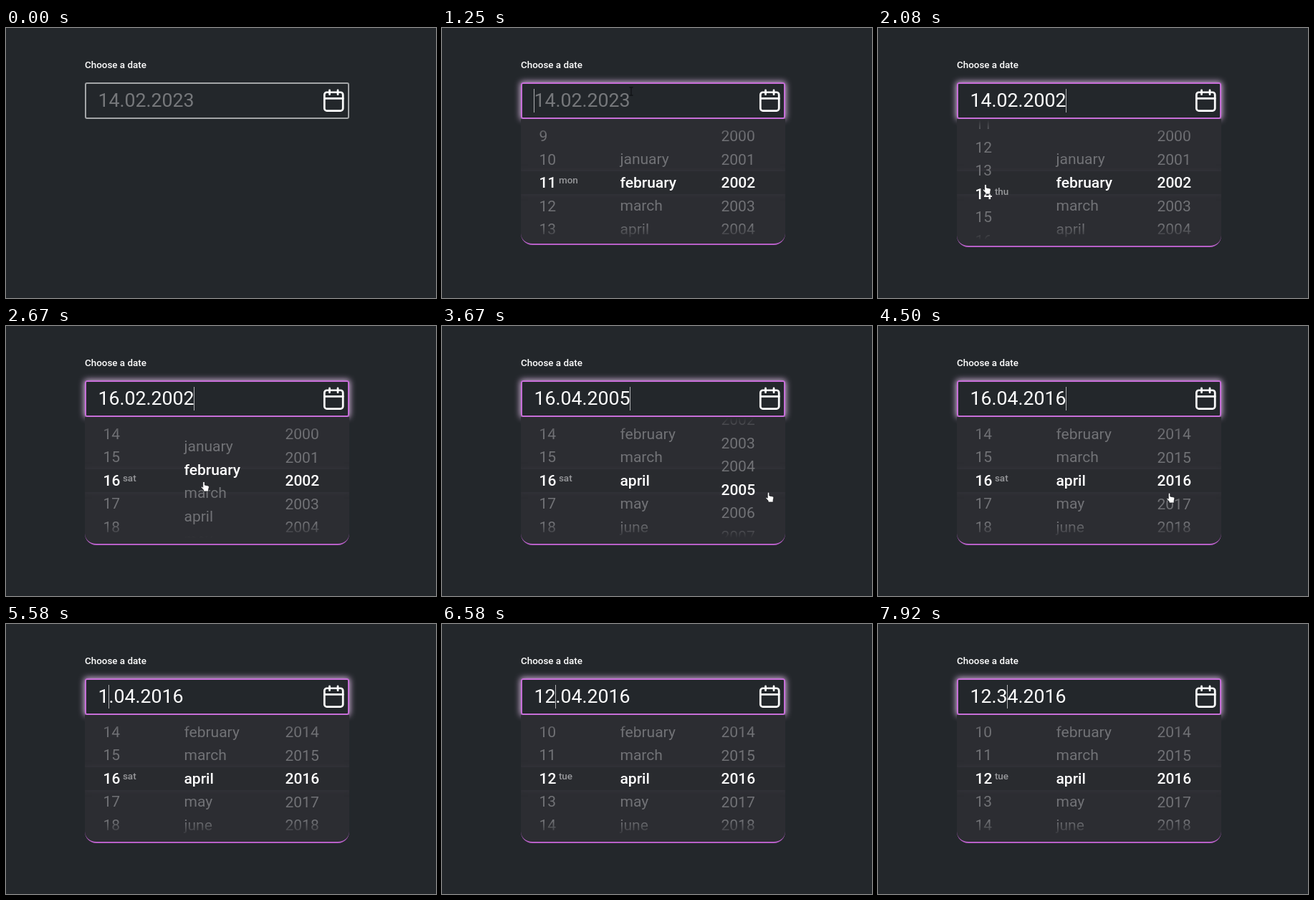
An HTML page that plays this animation: 600x377 px, repeating every 8 s.

```html
<!DOCTYPE html>
<html lang="en">
<head>
<meta charset="utf-8">
<title>Date picker</title>
<style>
  html, body { margin: 0; width: 100%; height: 100%; overflow: hidden; background: #23272b; }
  body { position: relative; font-family: Roboto, sans-serif; color: #fff; }
  body > *, .wheel, #band { position: absolute; box-sizing: border-box; }
  #label { left: 110px; top: 42px; font-size: 13.4px; font-weight: 500; line-height: 20px; }
  #field {
    left: 110px; top: 76px; width: 369px; height: 51px;
    border: 2px solid #a3a5a7; border-radius: 3px;
    padding-left: 16.4px; font-size: 26.7px; line-height: 46px; white-space: pre;
  }
  #field.focus { border-color: #c76fd8; box-shadow: 0 0 8px 1px rgba(238, 200, 247, .9); }
  #field.empty { color: #76787b; }
  #caret { position: absolute; top: 7px; width: 1px; height: 33px; background: #b0b1b3; visibility: hidden; }
  .focus #caret { visibility: visible; }
  #icon { left: 440.2px; top: 84px; width: 34.5px; height: 34.5px; }
  #icon, #beam { fill: none; stroke: #fff; stroke-width: 1.9; stroke-linecap: round; stroke-linejoin: round; }
  #panel {
    left: 110px; top: 127px; width: 369px; overflow: hidden;
    background: #2c2d32; border-bottom: 2px solid #b860c8; border-radius: 0 0 16px 16px;
  }
  #band {
    left: 0; top: 73px; width: 100%; height: 32px;
    background: #292b2f; box-shadow: 0 0 6px 1px rgba(58, 59, 65, .6);
  }
  #wheels {
    position: absolute; left: 0; top: 0; width: 100%; height: 178px; overflow: hidden;
    -webkit-mask-image: linear-gradient(transparent 1px, #000 22px, #000 148px, transparent 169px);
    mask-image: linear-gradient(transparent 1px, #000 22px, #000 148px, transparent 169px);
  }
  .wheel { top: 0; font-size: 21px; line-height: 32.5px; color: #717276; white-space: nowrap; }
  .wheel .on { color: #fff; font-weight: 500; }
  sup { position: absolute; margin: -4px 0 0 3.5px; font-size: 13.5px; line-height: 32.5px; color: #97989b; }
  #hand, #beam { left: 0; top: 0; overflow: visible; }
  #beam { stroke: #111316; stroke-width: 1.3; }
</style>
</head>
<body>
<div id="label">Choose a date</div>
<div id="field"><span id="before"></span><i id="caret"></i><span id="after"></span></div>
<svg id="icon" viewBox="0 0 24 24">
  <rect x="3" y="4" width="18" height="18" rx="2.4"/>
  <path d="M16 2v4M8 2v4M3 10h18"/>
</svg>
<div id="panel"><div id="band"></div><div id="wheels"></div></div>
<svg id="beam" width="10" height="12"><path d="M-2 -5.5h4M0 -5.5v11M-2 5.5h4"/></svg>
<svg id="hand" width="12" height="15">
  <path fill="#fff" stroke="#17191c" stroke-width=".8" stroke-linejoin="round"
    d="M-1.3 1Q0 -.7 1.3 1V5L6 6Q7.6 6.4 7.4 8L6.6 11V14H-.4V12L-3.6 8.6Q-4 6.8 -2.5 7.2L-1.3 8.3Z"/>
</svg>
<script>
const LOOP = 8000, ROW = 32.5, FIRST_ROW = 72.5;
const PLACEHOLDER = '14.02.2023';
const MONTHS = ['january', 'february', 'march', 'april', 'may', 'june', 'july',
  'august', 'september', 'october', 'november', 'december'];
const WEEKDAYS = ['sun', 'mon', 'tue', 'wed', 'thu', 'fri', 'sat'];
const FOCUS = 910, FIRST_SCROLL = 1830;

const $ = id => document.getElementById(id);
const clamp = x => Math.min(1, Math.max(0, x));
const smooth = x => x * x * (3 - 2 * x);
const progress = (t, start, end) => clamp((t - start) / (end - start));
const pad = n => String(n).padStart(2, '0');
const range = (from, to) => Array.from({ length: to - from + 1 }, (_, i) => from + i);

// Tracks are lists of [time, ...values], eased between neighbours.
function sample(track, t) {
  const next = track.findIndex(key => key[0] > t);
  if (next < 0) return track[track.length - 1].slice(1);
  if (next === 0) return track[0].slice(1);
  const a = track[next - 1], b = track[next];
  const k = smooth(progress(t, a[0], b[0]));
  return a.slice(1).map((v, i) => v + (b[i + 1] - v) * k);
}

const pointerTrack = [
  [330, 468, 89], [580, 264, 88.5], [1300, 264, 88.5], [1580, 150, 218],
  [2330, 150, 218], [2560, 276, 217], [2900, 276, 217], [3330, 455.5, 232],
  [4200, 455.5, 232], [4420, 406.5, 233], [4520, 406.5, 233], [5080, 159, 102]
];

// Keyboard edits: [time, text, caret index].
const edits = [
  [5120, '16.04.2016', 2], [5500, '1.04.2016', 1], [6080, '12.04.2016', 2],
  [6830, '12.04.2016', 3], [7080, '12.04.2016', 4], [7450, '12.4.2016', 3],
  [7750, '12.34.2016', 4]
];

function makeWheel(left, first, labels, track) {
  const el = document.createElement('div');
  el.className = 'wheel';
  el.style.left = left + 'px';
  const rows = labels.map(text => {
    const row = document.createElement('div');
    row.textContent = text;
    el.append(row);
    return row;
  });
  $('wheels').append(el);
  return {
    rows,
    update(t) {
      const index = sample(track, t)[0] - first;
      const selected = Math.round(index);
      el.style.transform = `translateY(${FIRST_ROW - index * ROW}px)`;
      rows.forEach((row, i) => row.classList.toggle('on', i === selected));
      return first + selected;
    }
  };
}

const dayWheel = makeWheel(25.5, 1, range(1, 31),
  [[FIRST_SCROLL, 11], [2330, 16], [6080, 16], [6500, 12]]);
const monthWheel = makeWheel(138.5, 1, MONTHS, [[2580, 2], [2870, 4]]);
const yearWheel = makeWheel(279.5, 1990, range(1990, 2030), [[3470, 2002], [4200, 2016]]);
const weekday = document.createElement('sup');

function place(el, visible, [x, y]) {
  el.style.display = visible ? 'block' : 'none';
  el.style.transform = `translate(${x}px, ${y}px)`;
}

function render(t) {
  const focused = t >= FOCUS, empty = t < FIRST_SCROLL;
  const day = dayWheel.update(t), month = monthWheel.update(t), year = yearWheel.update(t);

  weekday.textContent = WEEKDAYS[new Date(year, month - 1, day).getDay()];
  const dayRow = dayWheel.rows[day - 1];
  if (weekday.parentNode !== dayRow) dayRow.append(weekday);

  let text = empty ? PLACEHOLDER : `${pad(day)}.${pad(month)}.${year}`;
  let caret = empty ? 0 : text.length;
  for (const [time, value, index] of edits) if (t >= time) [text, caret] = [value, index];
  $('before').textContent = text.slice(0, caret);
  $('after').textContent = text.slice(caret);
  $('field').className = (focused ? 'focus ' : '') + (empty ? 'empty' : '');

  const open = 1 - (1 - progress(t, FOCUS, FOCUS + 440)) ** 3;
  $('panel').style.height = 178.5 * open + 'px';
  $('panel').style.display = focused ? 'block' : 'none';

  const pointer = sample(pointerTrack, t);
  const overField = pointer[1] < 127;
  place($('hand'), !overField, pointer);
  place($('beam'), overField && t > 330 && t < 5500, pointer);
}

const start = performance.now();
function tick() {
  render((performance.now() - start) % LOOP);
  requestAnimationFrame(tick);
}
tick();
</script>
</body>
</html>
```
